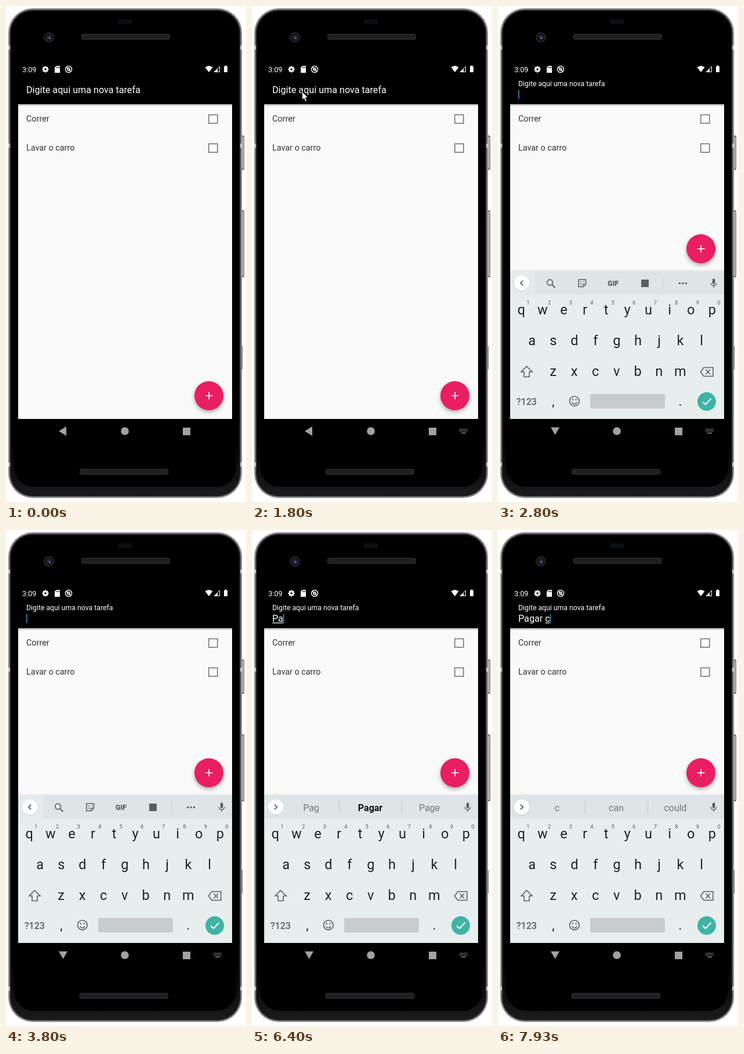
An HTML page with a canvas that plays this animation: 414 px wide and 854 px high, repeating every 8 s.

```html
<!DOCTYPE html>
<html lang="pt">
<head>
<meta charset="utf-8">
<title>Lista de tarefas</title>
<style>
html, body { margin: 0; width: 100%; height: 100%; overflow: hidden; background: #fff; }
canvas { display: block; width: 414px; height: 854px; }
</style>
</head>
<body>
<canvas id="stage" width="414" height="854"></canvas>
<script>
const ctx = document.getElementById('stage').getContext('2d');
const LOOP = 8000;
const WHITE = '#fff', PAPER = '#fafafb', KEYS = '#e8edee', BAR = '#dfe4e6', INK = '#202224', GREY = '#5a5e61', NAV = '#a2a2a2';

const clamp = v => Math.max(0, Math.min(1, v));
const span = (t, a, b) => clamp((t - a) / (b - a));
const mix = (a, b, p) => a + (b - a) * p;
const smooth = p => p * p * (3 - 2 * p);

function text(s, x, y, size, color, align = 'left', weight = 400) {
  ctx.font = `${weight} ${size}px Roboto, sans-serif`;
  ctx.textAlign = align;
  ctx.fillStyle = color;
  ctx.fillText(s, x, y);
  return ctx.measureText(s).width;
}
function rect(x, y, w, h, color) {
  ctx.fillStyle = color;
  ctx.fillRect(x, y, w, h);
}
function round(x, y, w, h, r, color) {
  ctx.beginPath();
  ctx.roundRect(x, y, w, h, r);
  ctx.fillStyle = color;
  ctx.fill();
}
function disc(x, y, r, color) {
  ctx.beginPath();
  ctx.arc(x, y, r, 0, 7);
  ctx.fillStyle = color;
  ctx.fill();
}
function ring(x, y, r, color, width) {
  ctx.beginPath();
  ctx.arc(x, y, r, 0, 7);
  ctx.strokeStyle = color;
  ctx.lineWidth = width;
  ctx.stroke();
}
function path(points, closed) {
  ctx.beginPath();
  for (let i = 0; i < points.length; i += 2) ctx.lineTo(points[i], points[i + 1]);
  if (closed) ctx.closePath();
}
function shape(points, color) {
  path(points, true);
  ctx.fillStyle = color;
  ctx.fill();
}
function line(points, color, width, closed) {
  path(points, closed);
  ctx.strokeStyle = color;
  ctx.lineWidth = width;
  ctx.stroke();
}
function fade(x, y, w, h, from, to) {
  const g = ctx.createLinearGradient(0, y, 0, y + h);
  g.addColorStop(0, from);
  g.addColorStop(1, to);
  rect(x, y, w, h, g);
}

function phone() {
  rect(0, 0, 414, 854, WHITE);
  for (const [y, h] of [[223, 59], [352, 115], [585, 41]]) {
    const w = y < 500 ? 5 : 2;
    round(405, y, w + 1, h, 1.5, '#6e6e70');
    rect(407, y + 2, w - 2, h - 4, '#b4b4b6');
  }
  ['#77777a', '#a0a0a3', '#4c4c4f', '#262628', '#18181a', '#0c0c0d'].forEach((c, i) =>
    round(4 + i, 4 + i, 403 - 2 * i, 843 - 2 * i, 42 - i, c));
  // soft sheen along the lower body
  ctx.beginPath();
  ctx.roundRect(9, 9, 393, 833, 37);
  const g = ctx.createLinearGradient(0, 754, 0, 846);
  g.addColorStop(0, '#020202');
  g.addColorStop(1, '#1c1c1e');
  ctx.fillStyle = g;
  ctx.fill();
  round(14, 12, 383, 816, 34, '#000');
  for (const y of [68, 237, 786]) {
    rect(4, y, 3, 7, '#c4c4c6');
    rect(404, y, 3, 7, '#c4c4c6');
  }
  round(193, 23, 24, 8, 2, '#0d1012');
  for (const [x, y, w] of [[130, 48, 153], [127, 797, 153]]) {
    round(x, y, w, 10, 4, '#343436');
    round(x + 1, y + 1, w - 2, 8, 3, '#202022');
  }
  disc(74, 54, 9, '#232326');
  disc(74, 54, 6.5, '#121216');
  disc(74, 54, 3.5, '#2c2c50');
  disc(75.5, 55.5, 1.2, '#8c8cb0');
}

function statusBar() {
  text('3:09', 28, 113.5, 12.6, WHITE);
  for (let i = 0; i < 8; i++) {
    ctx.save();
    ctx.translate(68, 109);
    ctx.rotate(i * Math.PI / 4);
    rect(-1.2, -5.6, 2.4, 3, WHITE);
    ctx.restore();
  }
  ring(68, 109, 3, WHITE, 2.4);
  shape([87, 103, 93, 103, 93, 115, 84, 115, 84, 106], WHITE);
  for (const x of [87, 89, 91]) rect(x, 104.5, 1, 2.5, '#000');
  ring(108, 109, 5.5, WHITE, 1.4);
  ring(108, 109, 2.3, WHITE, 1.2);
  line([104, 105, 112, 113], WHITE, 1.3);
  ctx.beginPath();
  ctx.moveTo(350, 114);
  ctx.lineTo(343.5, 105.5);
  ctx.quadraticCurveTo(350, 100.5, 356.5, 105.5);
  ctx.fillStyle = WHITE;
  ctx.fill();
  line([359, 113.5, 368.5, 113.5, 368.5, 104, 359, 113.5], WHITE, 1, true);
  shape([359, 114, 365, 114, 365, 108], WHITE);
  rect(376, 104, 6, 10, WHITE);
  rect(377.5, 102.5, 3, 2, WHITE);
}

const FOCUS = 2770;
const typing = [[5130, 'P'], [6100, 'Pa'], [6430, 'Pag'], [6960, 'Paga'], [7430, 'Pagar'], [7660, 'Pagar '], [7900, 'Pagar c']];
const hints = [[5100, 'P', '*Please', 'I'], [6070, 'Pa', 'Pay', 'Part'], [6400, 'Pag', '*Pagar', 'Page'],
  [6930, 'Paga', '*Pagar', 'Page'], [7870, 'c', 'can', 'could']];
const latest = (list, t) => list.filter(e => t >= e[0]).pop();

function header(t) {
  const p = smooth(span(t, 2640, 2780));
  text('Digite aqui uma nova tarefa', 35, mix(150, 138, p), mix(16.15, 12.25, p), WHITE);
  if (t < FOCUS) return;
  const [since, value] = latest(typing, t) || [FOCUS, ''];
  const w = text(value, 35, 158, 16.15, WHITE);
  const done = value.lastIndexOf(' ') + 1;
  if (done < value.length) {
    const x = 35 + ctx.measureText(value.slice(0, done)).width;
    rect(x, 159.4, 35 + w - x, 1.2, WHITE);
  }
  if ((t - since) % 1000 < 500) rect(35 + w, 144.5, 1.6, 15.5, '#3a93b4');
}

function fab(y) {
  ctx.save();
  ctx.shadowColor = 'rgba(0,0,0,.35)';
  ctx.shadowBlur = 7;
  ctx.shadowOffsetY = 3;
  disc(350, y, 25, '#e91e63');
  ctx.restore();
  rect(344, y - 0.8, 12.5, 1.6, WHITE);
  rect(349.4, y - 6.2, 1.6, 12.5, WHITE);
}

function list(t) {
  rect(21, 169, 369, 542, PAPER);
  fade(21, 169, 369, 4, 'rgba(0,0,0,.3)', 'rgba(0,0,0,0)');
  [['Correr', 194.5], ['Lavar o carro', 244.5]].forEach(([s, y]) => {
    text(s, 35, y + 4.8, 14.36, '#333');
    ctx.strokeStyle = '#757575';
    ctx.lineWidth = 1.6;
    ctx.strokeRect(349.8, y - 7.2, 15, 14.6);
  });
  fab(t < 2640 ? 671 : 418);
}

function navBar(t) {
  if (t < 2430) shape([91, 732, 104, 724, 104, 740], NAV);
  else shape([91, 725.5, 106, 725.5, 98.5, 738.5], NAV);
  disc(205, 732, 6.8, NAV);
  rect(305, 726, 13, 13, NAV);
  if (t < 200) return;
  for (let r = 0; r < 2; r++)
    for (let i = 0; i < 6; i++) rect(358 + i * 2.4, 728 + r * 3, 1.5, 1.6, '#8a8a8a');
  rect(361, 734.5, 8, 1.5, '#8a8a8a');
}

function mic() {
  round(369.8, 469.5, 4.6, 9.5, 2.3, GREY);
  ctx.beginPath();
  ctx.arc(372.1, 476.5, 5, 0.1, Math.PI - 0.1);
  ctx.strokeStyle = GREY;
  ctx.lineWidth = 1.4;
  ctx.stroke();
  rect(371.4, 481, 1.4, 4, GREY);
}

function tools(alpha) {
  ctx.save();
  ctx.globalAlpha *= alpha;
  rect(21, 457, 43, 40, '#e6eaec');
  ring(89.5, 476, 4.8, GREY, 1.7);
  line([93, 479.5, 98.5, 485], GREY, 2);
  line([139, 471, 151.5, 471, 151.5, 479, 147, 483.5, 139, 483.5], GREY, 1.6, true);
  line([147, 483, 147, 479, 151, 479], GREY, 1.2);
  disc(142.8, 475, 0.9, GREY);
  disc(148, 475, 0.9, GREY);
  line([142, 478, 144, 479.5, 146, 479], GREY, 1.1);
  text('GIF', 198.5, 481.5, 12.5, GREY, 'center', 900);
  rect(247, 471, 13, 13, GREY);
  rect(285, 466, 1, 23, '#cfd4d6');
  for (const x of [313.5, 319, 324.5]) disc(x, 477.5, 1.7, GREY);
  ctx.restore();
}

function suggestions(t) {
  const row = latest(hints, t);
  if (!row) return;
  rect(150, 466, 1, 23, '#c2c8ca');
  rect(258, 466, 1, 23, '#c2c8ca');
  row.slice(1).forEach((s, i) => {
    const bold = s[0] === '*';
    text(s.replace('*', ''), 102 + i * 102, 483.5, 16, bold ? '#101012' : '#73787b', 'center', bold ? 700 : 400);
  });
}

function keys() {
  const row = (letters, x, y) => [...letters].forEach((c, i) => text(c, x + i * 36.55, y, 23.5, INK, 'center'));
  row('qwertyuiop', 40.3, 531);
  row('asdfghjkl', 58.7, 584);
  row('zxcvbnm', 95, 637);
  [...'1234567890'].forEach((c, i) => text(c, 52 + i * 36.55, 513.5, 9.5, GREY, 'center'));

  line([49.5, 620.5, 59, 630, 54, 630, 54, 638.5, 45, 638.5, 45, 630, 40, 630], GREY, 1.6, true);
  line([349.5, 630, 355, 622.5, 371, 622.5, 371, 637.5, 355, 637.5], GREY, 1.6, true);
  line([358.5, 626, 366, 634], GREY, 1.7);
  line([366, 626, 358.5, 634], GREY, 1.7);

  text('?123', 49.3, 686.5, 16, GREY, 'center', 500);
  text(',', 95.5, 688, 22, INK, 'center');
  text('.', 314.5, 688, 22, INK, 'center');
  ring(131.8, 680.3, 8.3, GREY, 1.6);
  disc(128.9, 677.8, 1.3, GREY);
  disc(134.7, 677.8, 1.3, GREY);
  ctx.beginPath();
  ctx.arc(131.8, 680.8, 4.4, 0.3, Math.PI - 0.3);
  ctx.stroke();
  round(159, 668, 129, 25, 2, '#c8cccd');
  disc(360, 681, 16, '#40b3a5');
  line([353, 681.5, 358, 686, 367.5, 676], WHITE, 2);
}

function keyboard(t) {
  const p = span(t, 2430, 2710);
  if (!p) return;
  const open = smooth(span(t, 2690, 2790)) - smooth(span(t, 4270, 4470));
  ctx.save();
  ctx.beginPath();
  ctx.rect(21, 169, 369, 585);
  ctx.clip();
  ctx.globalAlpha = p;
  ctx.translate(0, 128 * (1 - p));
  fade(21, 453, 369, 4, 'rgba(0,0,0,0)', 'rgba(0,0,0,.08)');
  rect(21, 457, 369, 254, KEYS);
  rect(21, 457, 369, 40, BAR);
  if (open) tools(open);
  suggestions(t);
  mic();
  disc(41, 478, 13.2, 'rgba(0,0,0,.1)');
  disc(41, 477, 13, WHITE);
  const d = mix(2.2, -2.2, open);
  line([41 - d, 472.8, 41 + d, 477, 41 - d, 481.2], GREY, 1.8);
  keys();
  ctx.restore();
}

// Sweeps in from the lower right, overshoots the field, settles, then leaves the same way.
function pointer(t) {
  if (t < 30 || t > 2100) return;
  const enter = smooth(span(t, 30, 830)), settle = smooth(span(t, 870, 1170)), leave = Math.pow(span(t, 1800, 2100), 1.6);
  const x = mix(mix(mix(398, 67, enter), 86, settle), 394, leave);
  const y = mix(mix(mix(854, 173, enter), 147, settle), 854, leave);
  ctx.save();
  ctx.translate(x, y);
  const arrow = [0.5, 0.5, 0.5, 14.5, 3.6, 11.7, 6, 17.2, 8.4, 16.2, 6, 10.8, 10.4, 10.6];
  shape(arrow, WHITE);
  line(arrow, '#111', 0.8, true);
  ctx.restore();
}

function draw(t) {
  phone();
  statusBar();
  list(t);
  header(t);
  navBar(t);
  keyboard(t);
  pointer(t);
}

const start = performance.now();
function tick() {
  draw((performance.now() - start) % LOOP);
  requestAnimationFrame(tick);
}
tick();
</script>
</body>
</html>
```
